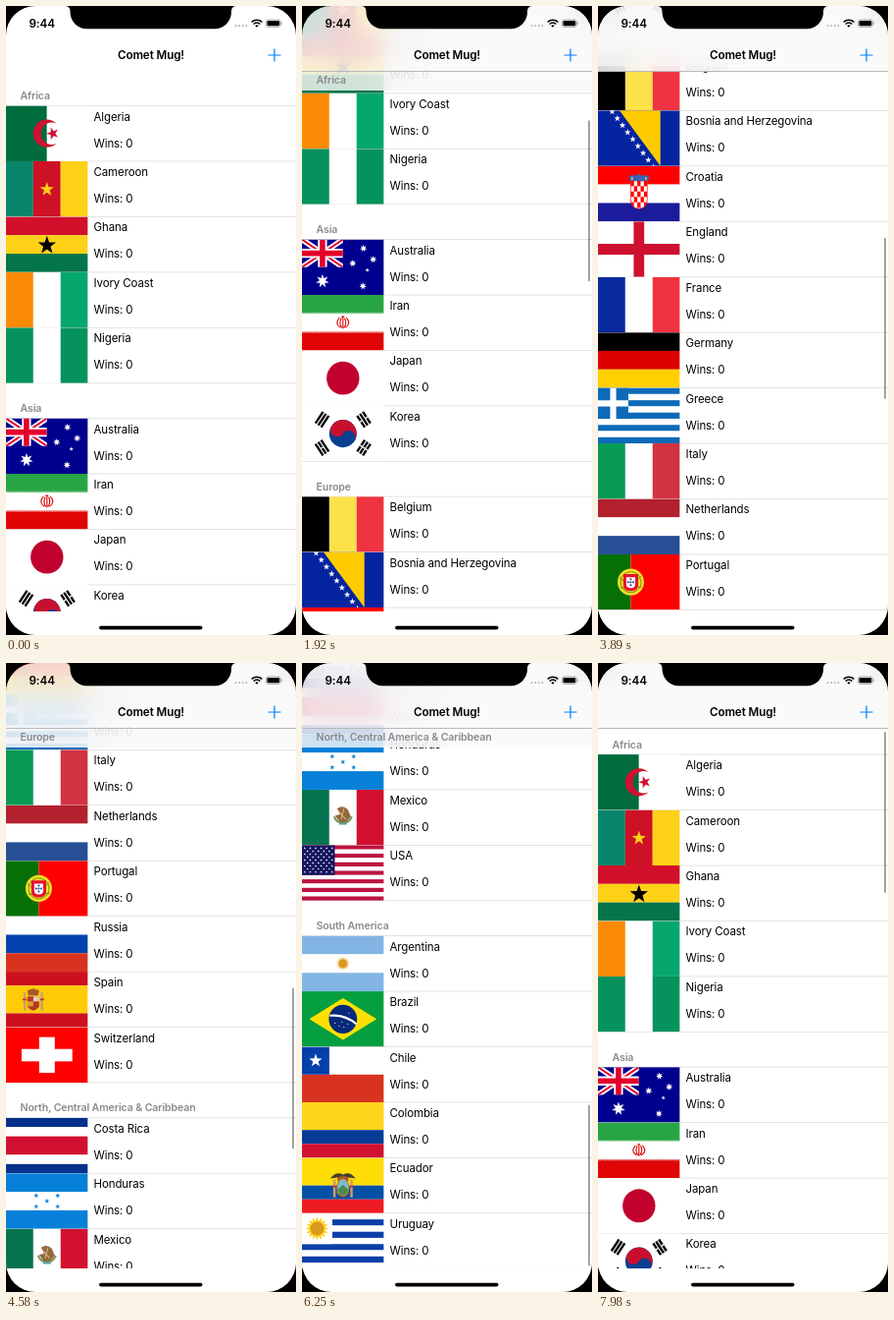
An HTML page that plays this animation: 296 by 640 pixels, repeating every 8000 ms.

```html
<!DOCTYPE html>
<html lang="en">
<head>
<meta charset="utf-8">
<title>Comet Mug!</title>
<style>
  html, body { margin: 0; width: 100%; height: 100%; overflow: hidden; background: #000; }
  #phone { position: relative; width: 296px; height: 640px; overflow: hidden; border-radius: 30px; background: #fff; }
  #phone, svg text { font-family: Inter, "Open Sans", sans-serif; letter-spacing: -.12px; }
  #view { position: absolute; width: 296px; height: 616px; overflow: hidden; }
  #list, #top { position: absolute; left: 0; top: 0; }
  .glass { position: absolute; left: 0; width: 296px; background: rgba(249,249,249,.82);
    -webkit-backdrop-filter: blur(12px); backdrop-filter: blur(12px); }
  #nav { top: 0; height: 65.6px; border-bottom: .8px solid #b9b9bb; box-sizing: content-box; }
  #pin { top: 0; height: 20px; line-height: 20px; text-indent: 14.5px; white-space: nowrap; }
  #pin, .head { font-size: 10.6px; font-weight: 600; color: #8a8a8e; fill: #8a8a8e; }
  .cell { font-size: 11.5px; }
  .bold { font-size: 11.7px; font-weight: 600; }
  #bar { position: absolute; left: 291.6px; top: 0; width: 2.2px; height: 163.5px; border-radius: 2px; background: rgba(0,0,0,.36); }
</style>
</head>
<body>
<div id="phone">
  <div id="view">
    <svg id="list" width="296" height="2100"></svg>
    <div id="pin" class="glass"></div>
    <div id="bar"></div>
  </div>
  <div id="nav" class="glass"></div>
  <svg id="top" width="296" height="640">
    <path d="M60 0Q65.500 0 65.500 5.500V6A17 17 0 0 0 82.500 23.300H213A17 17 0 0 0 230 6V5.500Q230 0 235.500 0Z"/>
    <text class="bold" x="23.500" y="21.700">9:44</text>
    <text class="bold" x="148" y="54.300" text-anchor="middle">Comet Mug!</text>
    <path d="M267.500 50H280.500M274 43.500V56.500" stroke="#007aff" stroke-width="1.200"/>
    <path d="M234.500 20H246" stroke="#b8b8b8" stroke-width="2.200" stroke-linecap="round" stroke-dasharray="0 3.600"/>
    <path d="M250.700 16.400A7.500 7.500 0 0 1 261.300 16.400M252.700 18.500A4.700 4.700 0 0 1 259.300 18.500" fill="none" stroke="#000" stroke-width="1.600"/>
    <path d="M254.300 20A2.400 2.400 0 0 1 257.700 20L256 21.700Z"/>
    <rect x="265.400" y="13.900" width="15" height="7.400" rx="2.200" fill="none" stroke="#888" stroke-width=".7"/>
    <rect x="266.500" y="15" width="12.800" height="5.200" rx="1.300"/>
    <path d="M281.400 16.300a1.400 1.400 0 0 1 0 2.600Z" fill="#888"/>
    <rect x="95" y="630.800" width="105.500" height="3.600" rx="1.800"/>
  </svg>
</div>
<script>
const $ = id => document.getElementById(id);

// Flag pieces, drawn on an 84 x 56 field
const rect = (x, y, w, h, c) => `<rect x="${x}" y="${y}" width="${w}" height="${h}" fill="${c}"/>`;
const disc = (x, y, r, c) => `<circle cx="${x}" cy="${y}" r="${r}" fill="${c}"/>`;
const path = (d, c) => `<path d="${d}" fill="${c}"/>`;
const line = (d, c, w, more = '') => `<path d="${d}" fill="none" stroke="${c}" stroke-width="${w}" ${more}/>`;
const repeat = (n, f) => Array.from({ length: n }, (_, i) => f(i)).join('');

function bands(colors, sizes, vertical) {
  const parts = sizes || colors.map(() => 1), sum = parts.reduce((a, b) => a + b);
  let at = 0;
  return colors.map((c, i) => {
    const a = at / sum;
    at += parts[i];
    const s = parts[i] / sum;
    return vertical ? rect(84 * a, 0, 84 * s, 56, c) : rect(0, 56 * a, 84, 56 * s, c);
  }).join('');
}
const tall = (...c) => bands(c, null, true);
const wide = (...c) => bands(c);

function star(x, y, r, c, n = 5, turn = -90, inner = .4) {
  const pts = Array.from({ length: 2 * n }, (_, i) => {
    const a = turn * Math.PI / 180 + i * Math.PI / n, q = i % 2 ? r * inner : r;
    return (x + q * Math.cos(a)).toFixed(2) + ',' + (y + q * Math.sin(a)).toFixed(2);
  });
  return `<polygon points="${pts.join(' ')}" fill="${c}"/>`;
}

const W = '#fff';

function unionJack() {
  const cross = 'M21 0V28M0 14H42', saltire = 'M0 0L42 28M42 0L0 28';
  return `<svg width="42" height="28">${line(saltire, W, 5.6)}${line(saltire, '#e4002b', 1.9)}` +
    `${line(cross, W, 9.3)}${line(cross, '#e4002b', 5.6)}</svg>`;
}

function trigram(angle, broken) {
  const bars = repeat(3, i => rect(21 + i * 3.5, -7, 2.4, 14, '#000') +
    (broken[i] ? rect(20.8 + i * 3.5, -.7, 2.8, 1.4, W) : ''));
  return `<g transform="translate(42 28) rotate(${angle})">${bars}</g>`;
}

function checkShield() {
  const cells = repeat(25, i => i % 2 ? '' : rect(33.5 + i % 5 * 3.4, 15 + Math.floor(i / 5) * 5.4, 3.4, 5.4, '#f00'));
  const shape = 'M33.500 15H50.500V33Q50.500 43 42 43Q33.500 43 33.500 33Z';
  return `<clipPath id="shield"><path d="${shape}"/></clipPath>${path(shape, W)}<g clip-path="url(#shield)">${cells}</g>` +
    line(shape, '#f00', .7) + path('M33 15L31.500 10.500L35 9L38.500 10L42 8L45.500 10L49 9L52.500 10.500L51 15Z', '#3b62b5') +
    line('M35 11V14M49 11V14', '#ffd34d', 1.2);
}

const sun = (x, y, r, c) => star(x, y, r, c, 16, 0, .65) + disc(x, y, r * .58, '#d99a1c');

const crest = (x, y) => rect(x - 10, y - 8, 2.5, 18, '#c8a06a') + rect(x + 7.500, y - 8, 2.5, 18, '#c8a06a') +
  path(`M${x - 6} ${y - 4}h12v10q-6 8-12 0z`, '#b5372e') + rect(x, y - 4, 6, 5, '#e9cfc0') + rect(x - 6, y + 1, 6, 5, '#d8a021') +
  path(`M${x - 5} ${y - 5}l-1-5l6-2l6 2l-1 5z`, '#a8572a') + line(`M${x - 11} ${y - 1}h4M${x + 7} ${y - 1}h4`, '#b5372e', 1.6);

const flags = {
  Algeria: () => tall('#006b3c', W) + path('M51.600 17.800A14 14 0 1 0 51.600 38.200A11.200 11.200 0 1 1 51.600 17.800Z', '#d21034') +
    star(48, 28, 6.5, '#d21034', 5, 180),
  Cameroon: () => tall('#07856a', '#ce1126', '#fcd116') + star(42, 28.5, 7.5, '#fcd116'),
  Ghana: () => wide('#d2102c', '#fcd116', '#04754a') + star(42, 29, 9.7, '#000'),
  'Ivory Coast': () => tall('#fb8b05', W, '#05a76c'),
  Nigeria: () => tall('#06925c', W, '#06925c'),
  Australia: () => rect(0, 0, 84, 56, '#00008f') + unionJack() + star(21, 42, 7, W, 7, -90, .45) +
    [[63, 9], [52, 24], [73, 20], [62.5, 47]].map(([x, y]) => star(x, y, 3.8, W, 7, -90, .45)).join('') + star(67, 31, 2.2, W),
  Iran: () => wide('#27a544', W, '#df0505') +
    line('M0 18.200H84', '#8fd09c', 1.6, 'stroke-dasharray="1.500 1"') + line('M0 37.800H84', '#f08c8c', 1.6, 'stroke-dasharray="1.500 1"') +
    line('M38.500 23Q33 29 39.500 33M45.500 23Q51 29 44.500 33M40.300 23.500Q37.500 29 41 33M43.700 23.500Q46.500 29 43 33M42 22V34M40.500 22H43.500', '#da0000', 1.1),
  Japan: () => rect(0, 0, 84, 56, W) + disc(42, 28, 16.8, '#c1022f'),
  Korea: () => rect(0, 0, 84, 56, W) + disc(42, 28, 14, '#0a3f8f') +
    `<g transform="rotate(33.700 42 28)">${path('M28 28A14 14 0 0 1 56 28A7 7 0 0 0 42 28A7 7 0 0 1 28 28Z', '#c8102e')}</g>` +
    trigram(213.7, [0, 0, 0]) + trigram(-33.7, [1, 0, 1]) + trigram(146.3, [0, 1, 0]) + trigram(33.7, [1, 1, 1]),
  Belgium: () => tall('#000', '#fbe14a', '#ef3340'),
  'Bosnia and Herzegovina': () => rect(0, 0, 84, 56, '#0524a0') + path('M22 0H64V56Z', '#fecb00') +
    repeat(9, i => star(14.5 + i * 5.3, 1 + i * 7, 3.4, W)),
  Croatia: () => wide('#f00', W, '#1b1b9c') + checkShield(),
  England: () => rect(0, 0, 84, 56, W) + line('M42 0V56M0 28H84', '#ce1131', 10.8),
  France: () => tall('#08299c', W, '#ef3340'),
  Germany: () => wide('#000', '#dd0000', '#ffd000'),
  Greece: () => wide(...Array.from({ length: 9 }, (_, i) => i % 2 ? W : '#0d6ab8')) + rect(0, 0, 31.1, 31.1, '#0d6ab8') +
    line('M15.550 0V31.100M0 15.550H31.100', W, 6.2),
  Italy: () => tall('#069a52', W, '#d23340'),
  Netherlands: () => wide('#b3202e', W, '#264f96'),
  Portugal: () => rect(0, 0, 33.6, 56, '#067006') + rect(33.6, 0, 50.4, 56, '#f00') +
    disc(33.6, 28, 13.5, '#f3e028') + line('M33.600 17.500a10.500 10.500 0 1 0 .1 0M22 23Q33 35 45 33M23 34Q35 34 44 22', '#5c7a14', .8) +
    path('M26 20H41.200V31Q41.200 37 33.600 37Q26 37 26 31Z', '#e8112d') + path('M29 23H38.200V30Q38.200 34 33.600 34Q29 34 29 30Z', W) +
    [[33.6, 25], [33.6, 28], [33.6, 31], [31, 28], [36.2, 28]].map(([x, y]) => disc(x, y, 1, '#123a8c')).join(''),
  Russia: () => wide(W, '#0442b0', '#d8331f'),
  Spain: () => bands(['#cc1020', '#ffcb05', '#cc1020'], [1, 2, 1]) + crest(28, 29),
  Switzerland: () => rect(0, 0, 84, 56, '#f00') + rect(34, 10, 16, 36, W) + rect(16, 22, 52, 12.5, W),
  'Costa Rica': () => bands(['#06308c', W, '#d21030', W, '#06308c'], [1, 1, 2, 1, 1]),
  Honduras: () => wide('#0680d8', W, '#0680d8') +
    [[42, 28], [31, 22.5], [53, 22.5], [31, 33.5], [53, 33.5]].map(([x, y]) => star(x, y, 2.7, '#0680d8')).join(''),
  Mexico: () => tall('#067350', W, '#d21030') + line('M33 27A9.500 9.500 0 0 0 51 27', '#7d9a62', 2.2) +
    path('M36 19Q42 15 47 20L50 27L45 33L39 33L34 26L39 25Z', '#94683b') + line('M37 21L45 30M43 19L40 30', '#d4b892', 1) +
    line('M38 34.500H46', '#58a0a0', 1.8),
  USA: () => wide(...Array.from({ length: 13 }, (_, i) => i % 2 ? W : '#bd1440')) + rect(0, 0, 33.6, 30.15, '#14145f') +
    repeat(9, r => repeat(6 - r % 2, i => star(2.8 + r % 2 * 2.8 + i * 5.6, 3 + r * 3, 1.3, W))),
  Argentina: () => wide('#82b5e4', W, '#82b5e4') + sun(42, 28, 7, '#eebb62'),
  Brazil: () => rect(0, 0, 84, 56, '#069f40') + path('M7.500 28L42 7L76.500 28L42 49Z', '#fee000') + disc(42, 28, 14.5, '#06297b') +
    line('M28.500 24.500Q44 23 55.800 33', W, 2.2) +
    [[34, 32], [38, 35], [43, 36], [47, 33], [41, 31], [48, 22]].map(([x, y]) => disc(x, y, .6, W)).join(''),
  Chile: () => bands([W, '#d8331f']) + rect(0, 0, 28, 28, '#0440ac') + star(14, 14, 7, W),
  Colombia: () => bands(['#fcd41a', '#063c98', '#d21030'], [2, 1, 1]),
  Ecuador: () => bands(['#ffdd06', '#0650a5', '#ed1c24'], [2, 1, 1]) +
    path('M29 21Q35 13 42 17Q49 13 55 21L48 20H36Z', '#443c32') + crest(42, 30) +
    `<ellipse cx="42" cy="30" rx="6" ry="8.500" fill="#7cbbd4" stroke="#b58a2a"/>` + path('M36.500 32L42 27L47.500 32Q46 38 42 38Q38 38 36.500 32Z', '#4d8c4a'),
  Uruguay: () => wide(...Array.from({ length: 9 }, (_, i) => i % 2 ? '#0b3fa8' : W)) + rect(0, 0, 31.1, 31.1, W) + sun(15.5, 15.5, 12, '#fcd116'),
};

// Table layout: 13 teams in Europe, 35.8 px between sections
const ROW = 56.45, HEAD = 20, GAP = 35.8, NAV = 66;
const names = Object.keys(flags);
const sections = [['Africa', 5], ['Asia', 4], ['Europe', 13], ['North, Central America & Caribbean', 4], ['South America', 6]];
const rule = y => rect(0, y - .4, 296, .8, '#dcdcde');
let y = 101.5, next = 0, markup = '';
for (const s of sections) {
  s.top = y;
  markup += `<text class="head" x="14.500" y="${y - 6.4}">${s[0].replace('&', '&amp;')}</text>` + rule(y);
  for (let i = 0; i < s[1]; i++, y += ROW) {
    const name = names[next++];
    markup += rule(y + ROW) +
      `<svg y="${y}" width="83.600" height="${ROW}" viewBox="0 0 84 56" preserveAspectRatio="none">${flags[name]()}</svg>` +
      `<text class="cell" x="89.500" y="${y + 15}">${name}</text><text class="cell" x="89.500" y="${y + 42}">Wins: 0</text>`;
  }
  s.end = y;
  y += GAP;
}
$('list').innerHTML = markup;

// Screen updates: first, last, count
const ticks = [[0, 0, 1], [1110, 1810, 7], [1920, 2490, 6], [2630, 2970, 4], [3540, 4340, 8], [4470, 4580, 2], [4680, 5230, 6],
  [5350, 5570, 3], [5700, 6150, 5], [6250, 6370, 2], [6890, 7110, 3], [7210, 7640, 5], [7750, 7980, 3]]
  .flatMap(([a, b, n]) => Array.from({ length: n }, (_, i) => a + (b - a) * i / (n - 1 || 1)));

// Scroll curve: time, offset, speed in px per ms
const curve = [[0, 0, 0], [1000, 0, 0], [1920, 182, .4], [2970, 515.7, 0], [3430, 515.7, 0], [4580, 988, .43], [5570, 1358.4, .29],
  [6370, 1435, 0], [6780, 1435, 0], [7110, 992.2, -2.1], [7980, 8.4, -.05], [8000, 8, 0]];

function offsetAt(t) {
  const i = curve.findIndex(k => k[0] > t), [t0, p0, v0] = curve[i - 1], [t1, p1, v1] = curve[i];
  const d = t1 - t0, u = (t - t0) / d, w = 1 - u;
  return p0 * (1 + 2 * u) * w * w + p1 * (3 - 2 * u) * u * u + d * u * w * (v0 * w - v1 * u);
}

function draw(t) {
  const i = ticks.findLastIndex(k => k <= t);
  const pos = offsetAt(ticks[i]), late = offsetAt(ticks[Math.max(i - 1, 0)]);
  const moved = pos > 0;
  $('list').style.transform = `translateY(${-pos}px)`;
  $('bar').style.transform = `translateY(${67.8 + pos * .266}px)`;
  $('nav').hidden = $('bar').hidden = !moved;

  // The pinned title follows one update late
  const s = sections.findLast(s => s.top - HEAD - late <= NAV);
  const flow = s ? s.top - HEAD - pos : NAV;
  $('pin').hidden = !s || !moved || flow >= NAV;
  if (s) {
    $('pin').textContent = s[0];
    $('pin').style.transform = `translateY(${Math.min(NAV, s.end - late - HEAD)}px)`;
  }
}

function loop(now) {
  draw(now % 8000);
  requestAnimationFrame(loop);
}
draw(0);
requestAnimationFrame(loop);
</script>
</body>
</html>
```
